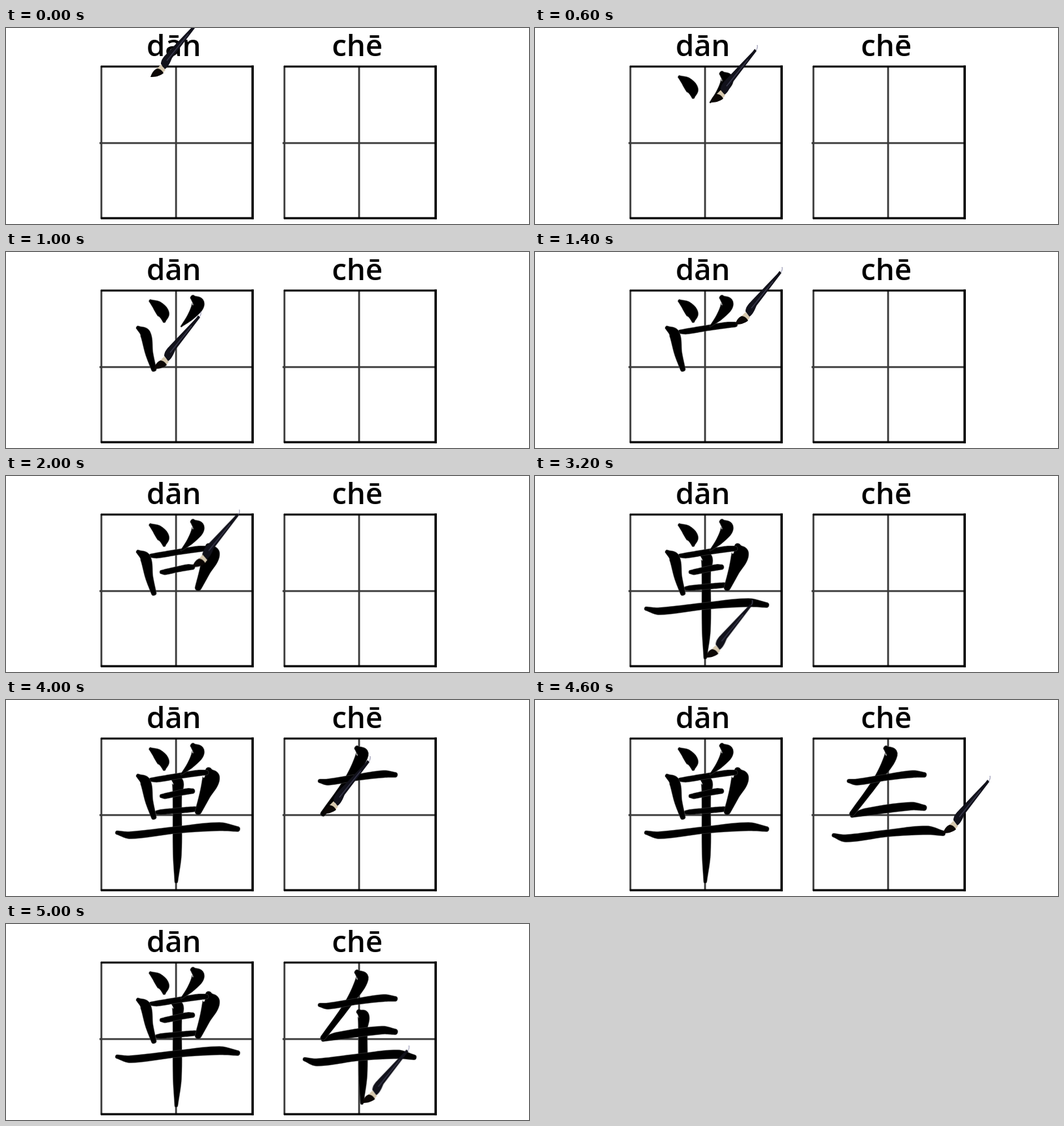
Write an HTML page that moves like this. It is 800 by 300 pixels and loops after 5.2 s.

```html
<!DOCTYPE html>
<html lang="zh">
<head>
<meta charset="utf-8">
<title>dān chē</title>
<style>
  html, body { margin: 0; width: 100%; height: 100%; overflow: hidden; background: #fff; }
  svg { display: block; width: 800px; height: 300px; }
  text { font: 600 45.5px "Open Sans", "Noto Sans", sans-serif; text-anchor: middle; }
  #ink path { stroke: #555; stroke-width: .5; opacity: 0; }
</style>
</head>
<body>
<svg viewBox="0 0 800 300">
  <defs>
    <g id="grid" fill="none" stroke="#000">
      <path d="M.9 1V235M115.1 2V234M-2 119.2H232" stroke="#3a3a3a" stroke-width="2.8"/>
      <path d="M0 2H234M0 234.2H234" stroke-width="3.2"/>
      <path d="M232.2 .5V235.5" stroke-width="3.6"/>
    </g>
  </defs>

  <text x="256.7" y="43.2">dān</text>
  <text x="537.3" y="43.2">chē</text>
  <use href="#grid" x="145" y="57"/>
  <use href="#grid" x="425" y="57"/>

  <g id="ink"></g>

  <!-- The brush tip sits at the origin. -->
  <g id="brush">
    <path d="M69-79Q73-82 72-88" fill="none" stroke="#77779a" stroke-width=".9"/>
    <path d="M10-13L16-19L23-11L19-6Z" fill="#d6c8ae"/>
    <path d="M0 0C2-6 5-11 10-13Q16-13 20-6C14-1 7 0 0 0Z" fill="#0c0705"/>
    <path d="M16-20C16-26 20-31 25-36L65-78L68-82L71-79L68-75L33-29C30-22 27-15 22-12Z" fill="#12121b"/>
    <path d="M25-25L58-66" stroke="#38384c" stroke-width="1.4"/>
  </g>
</svg>
<script>
  const STEP = 200;
  const ink = document.getElementById('ink');

  // A stroke is a centre line of [x, y, radius] points.
  // Horizontal: presses down at the head, lifts, then swells at the end.
  function heng(x1, y1, x2, y2, wave) {
    const at = (t, dy, r) => [x1 + (x2 - x1) * t, y1 + (y2 - y1) * t + dy, r];
    return [
      at(0, 0, 3),
      at(.11, wave, 4 + wave * .35),
      at(.5, -wave / 3, 4.2 + wave * .25),
      at(.85, -wave, 4.3 + wave * .5),
      at(1, 0, 4)
    ];
  }

  // Vertical: a slanted head, then a straight fall to a point.
  function shu(x, top, bottom) {
    return [[x - 6, top, 4], [x + .7, top + 6, 8.7], [x, top + 26, 7], [x, bottom - 43, 6.6], [x - 1.6, bottom, 2.5]];
  }

  const dan = [
    [[221, 75, 2.5], [232, 83, 8], [241, 95, 9], [242, 106, 2.5]],
    [[286, 70, 4], [294, 79, 9.5], [284, 97, 6], [268, 114, 1]],
    [[202, 116, 3], [213, 125, 8], [219, 155, 6], [226, 179, 4]],
    heng(222, 122, 306, 111, .8),
    [[310, 108, 5], [314, 119, 13], [304, 146, 8.5], [294, 171, 5]],
    heng(238, 147, 285, 139.5, .8),
    heng(231, 172, 289, 167, 0),
    heng(170, 203, 354, 197.5, 4.5),
    shu(262, 120, 278)
  ];
  const che = [
    heng(480, 124, 595, 114.5, 2.6),
    [[537, 74, 4], [545, 83, 9.5], [524, 121, 5.8], [485, 174, 4]],
    [[485, 177, 3], [506, 171.5, 5.8], [575, 162.5, 6.3], [595, 165, 4.5]],
    heng(457, 207, 624, 204, 5),
    shu(546, 134.5, 274)
  ];

  const distance = (a, b) => Math.hypot(b[0] - a[0], b[1] - a[1]);

  // Smooth curve through the points, spaced by chord length.
  function sample(points, parts = 10) {
    const slope = i => {
      const before = Math.max(i - 1, 0), after = Math.min(i + 1, points.length - 1);
      let length = 0;
      for (let k = before; k < after; k++) length += distance(points[k], points[k + 1]);
      return points[i].map((_, axis) => (points[after][axis] - points[before][axis]) / length);
    };
    const curve = [];
    for (let i = 0; i < points.length - 1; i++) {
      const a = points[i], b = points[i + 1], da = slope(i), db = slope(i + 1), h = distance(a, b);
      for (let k = i ? 1 : 0; k <= parts; k++) {
        const t = k / parts, s = t * t * (3 - 2 * t);
        curve.push(a.map((v, axis) => v + (b[axis] - v) * s
          + h * t * (1 - t) * (da[axis] * (1 - t) - db[axis] * t)));
      }
    }
    return curve;
  }

  // Outline at the radius on both sides, closed by round caps.
  function outline(points) {
    const curve = sample(points);
    const side = sign => curve.map(([x, y, r], i) => {
      const a = curve[Math.max(i - 1, 0)], b = curve[Math.min(i + 1, curve.length - 1)];
      const k = sign * r / distance(a, b);
      return `${(x + (b[1] - a[1]) * k).toFixed(2)} ${(y - (b[0] - a[0]) * k).toFixed(2)}`;
    });
    const left = side(1), right = side(-1).reverse();
    const cap = (r, to) => `A${r} ${r} 0 0 1 ${to}`;
    return `M${left.join('L')}${cap(points.at(-1)[2], right[0])}L${right.join('L')}${cap(points[0][2], left[0])}Z`;
  }

  // The brush rests at each stroke's start, then its end; joined strokes skip the start.
  const tips = [];
  const marks = [];
  for (const stroke of [...dan, ...che]) {
    const start = stroke[0], end = stroke.at(-1);
    if (!tips.length || distance(tips.at(-1), start) > 10) tips.push(start);
    const path = document.createElementNS('http://www.w3.org/2000/svg', 'path');
    path.setAttribute('d', outline(stroke));
    ink.prepend(path);
    marks.push([path, tips.length]);
    tips.push(end);
  }

  // Holds each pose until the next one, then loops.
  function playHeld(element, poses) {
    const frames = poses.map(([step, pose]) => ({ ...pose, offset: step / tips.length, easing: 'steps(1, end)' }));
    frames.push({ ...poses.at(-1)[1], offset: 1 });
    element.animate(frames, { duration: tips.length * STEP, iterations: Infinity });
  }

  playHeld(document.getElementById('brush'),
    tips.map(([x, y], step) => [step, { transform: `translate(${x}px, ${y}px)` }]));
  for (const [path, step] of marks) {
    playHeld(path, [[0, { opacity: 0 }], [step, { opacity: 1 }]]);
  }
</script>
</body>
</html>
```
